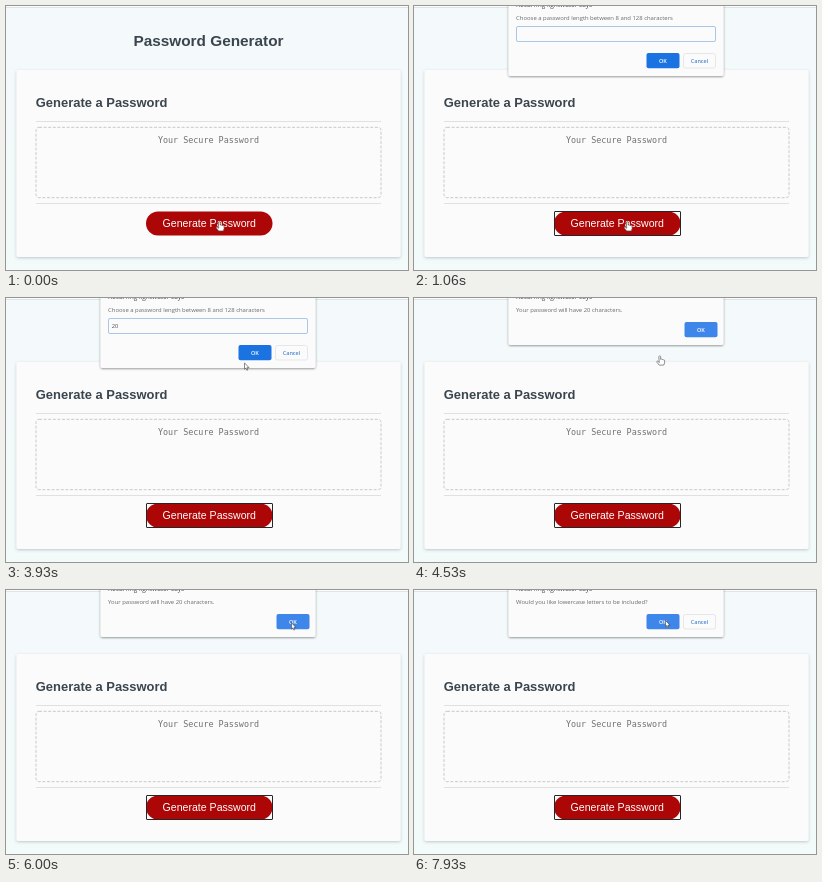
Recreate the animation shown at these times as an HTML page. Size 402 px wide and 264 px high, loop 8000 ms.

```html
<!DOCTYPE html>
<html lang="en">
<head>
<meta charset="utf-8">
<title>Password Generator</title>
<style>
  html, body { margin: 0; width: 100%; height: 100%; overflow: hidden; background: #f4fafa; }
  svg { display: block; width: 100vw; height: 100vh; }
  .page { font-family: "Liberation Sans", Arial, sans-serif; fill: #3b454e; }
  .bold { font-weight: 700; }
  .mono { font: 8.41px "DejaVu Sans Mono", monospace; fill: #707070; }
  .ui { font: 5.92px "Open Sans", sans-serif; fill: #66696d; }
  .label { font-size: 5.5px; font-weight: 600; text-anchor: middle; }
</style>
</head>
<body>
<svg viewBox="0 0 402 264">
  <defs>
    <linearGradient id="sky" x2="0" y2="1">
      <stop offset="0" stop-color="#f4fafb"/>
      <stop offset="1" stop-color="#f3fafa"/>
    </linearGradient>
    <filter id="soft" x="-10%" y="-20%" width="120%" height="140%">
      <feDropShadow dx="0" dy="1" stdDeviation="1.6" flood-color="#405060" flood-opacity=".3"/>
    </filter>
    <filter id="deep" x="-10%" y="-30%" width="120%" height="160%">
      <feDropShadow dx="0" dy=".7" stdDeviation="1.2" flood-color="#000" flood-opacity=".48"/>
    </filter>
  </defs>

  <g class="page">
    <rect width="402" height="264" fill="url(#sky)"/>
    <rect width="402" height="1" fill="#fbfcfc"/>
    <rect y="1" width="402" height="1" fill="#dfe5e7"/>
    <text class="bold" x="202.5" y="40.3" font-size="15.35" text-anchor="middle">Password Generator</text>
    <rect x="10.5" y="64" width="384" height="187" rx="2" fill="#fbfbfb" filter="url(#soft)"/>
    <text class="bold" x="29.8" y="100.9" font-size="12.95">Generate a Password</text>
    <path d="M30 115.5H375M30 197.5H375" stroke="#dfe0e0"/>
    <rect x="30" y="121.3" width="345" height="70.4" rx="3" fill="none" stroke="#c8c9ca" stroke-dasharray="3 1.6"/>
    <text class="mono" x="202.5" y="137.2" text-anchor="middle">Your Secure Password</text>
    <rect x="140" y="205.5" width="126.5" height="24" rx="12" fill="#ad0606"/>
    <text x="203.3" y="220.8" font-size="10.57" text-anchor="middle" fill="#fff">Generate Password</text>
    <rect id="focus" x="140.5" y="205.5" width="126" height="24" rx=".5" fill="none" stroke="#262626"/>
  </g>

  <g id="dialog" class="ui">
    <rect id="panel" x="94.5" y="-20" width="215" rx="2" fill="#fbfbfb" filter="url(#deep)"/>
    <text x="102" y="1.2" font-size="6.5" fill="#4a4d51">Recurring lightwater says</text>
    <text id="message" x="102.1" y="14.3"></text>
    <g id="field">
      <rect x="102.5" y="20.5" width="199" height="15" rx="1.5" fill="#fbfbfb" stroke="#a9c8e6"/>
      <text id="typed" x="105.8" y="30.1" font-size="5.8" fill="#4a4d51"></text>
      <rect id="caret" y="24" width=".7" height="8" fill="#333"/>
    </g>
    <g id="ok">
      <rect id="okBox" width="33" height="15.3" rx="2"/>
      <text class="label" x="16.4" y="9.8" fill="#fff">OK</text>
    </g>
    <g id="cancel">
      <rect id="cancelBox" x=".5" y=".5" width="32" height="14.5" rx="2" stroke="#e3e5e8" stroke-width=".9"/>
      <text class="label" x="16.5" y="9.8" fill="#4a86d0">Cancel</text>
    </g>
  </g>

  <g id="cursor" stroke-linejoin="round" stroke-linecap="round">
    <path id="hand" fill="#fff" stroke="#555" stroke-width=".65"
      d="M-.8 .6Q0-.4 .8 .6V3.6Q1.7 2.9 2.3 3.9Q3.2 3.3 3.7 4.3Q4.7 3.9 4.8 5V7.2L3.9 9.4H-.6L-3 6.4Q-3.2 5.2-2.1 5.4L-.8 6.5Z"/>
    <path id="arrow" fill="#fff" stroke="#4c4c4c" stroke-width=".65"
      d="M0 0V6L1.4 4.8L2.4 7L3.3 6.6L2.4 4.4H4.2Z"/>
  </g>
</svg>
<script>
const LOOP = 8000;
const $ = id => document.getElementById(id);
const set = (id, attrs) => { for (const k in attrs) $(id).setAttribute(k, attrs[k]); };
const show = (id, on) => set(id, { visibility: on ? "inherit" : "hidden" });
const move = (id, x, y) => set(id, { transform: `translate(${x} ${y})` });

const dialogs = [
  { at: 460, kind: "prompt", bottom: 70, message: "Choose a password length between 8 and 128 characters" },
  { at: 4450, kind: "alert", bottom: 47, message: "Your password will have 20 characters." },
  { at: 6150, kind: "confirm", bottom: 47, message: "Would you like lowercase letters to be included?" }
];
const keys = [[2800, "2"], [3000, "20"]];

// Pointer tip: time, x, y
const path = [
  [0, 213.3, 215.5], [1080, 213.3, 215.5], [1860, 220, 151.7], [3300, 220, 151.7],
  [3930, 238.5, 65.3], [4300, 246, 57.7], [5130, 245, 57.7], [5800, 285.5, 33],
  [6730, 285.5, 33.7], [7000, 285.5, 33.7], [7660, 251.5, 30.7], [8000, 251.5, 30.7]
];

function pointer(t) {
  const i = path.findIndex(p => p[0] > t);
  const [t0, x0, y0] = path[i - 1], [t1, x1, y1] = path[i];
  const u = (t - t0) / (t1 - t0), e = u * u * (3 - 2 * u);
  return [x0 + (x1 - x0) * e, y0 + (y1 - y0) * e];
}

function draw(t) {
  const [px, py] = pointer(t);
  const box = dialogs.filter(d => t >= d.at).pop();
  show("focus", box);
  show("dialog", box);
  if (box) {
    const prompt = box.kind === "prompt", alone = box.kind === "alert";
    const top = prompt ? 47 : 24, okX = alone ? 270.5 : 232.5;
    const over = x => px >= x && px < x + 33 && py >= top && py < top + 15.5;
    set("panel", { height: box.bottom + 20 });
    $("message").textContent = box.message;
    move("ok", okX, top);
    move("cancel", 269, top);
    set("okBox", { fill: !prompt || over(okX) ? "#3f86ea" : "#1a73e0" });
    show("cancel", !alone);
    set("cancelBox", { fill: over(269) ? "#f4f7fb" : "#fbfbfb" });

    const key = keys.filter(k => t >= k[0]).pop();
    const text = key ? key[1] : "";
    const since = t - (key ? key[0] : box.at);
    show("field", prompt);
    $("typed").textContent = text;
    set("caret", { x: 105.5 + text.length * 3.35 });
    show("caret", prompt && since % 1000 < 500);
  }
  const inside = box && py < box.bottom;
  move("cursor", px, py);
  show("hand", !inside);
  show("arrow", inside);
}

function tick() {
  draw(performance.now() % LOOP);
  requestAnimationFrame(tick);
}
tick();
</script>
</body>
</html>
```
